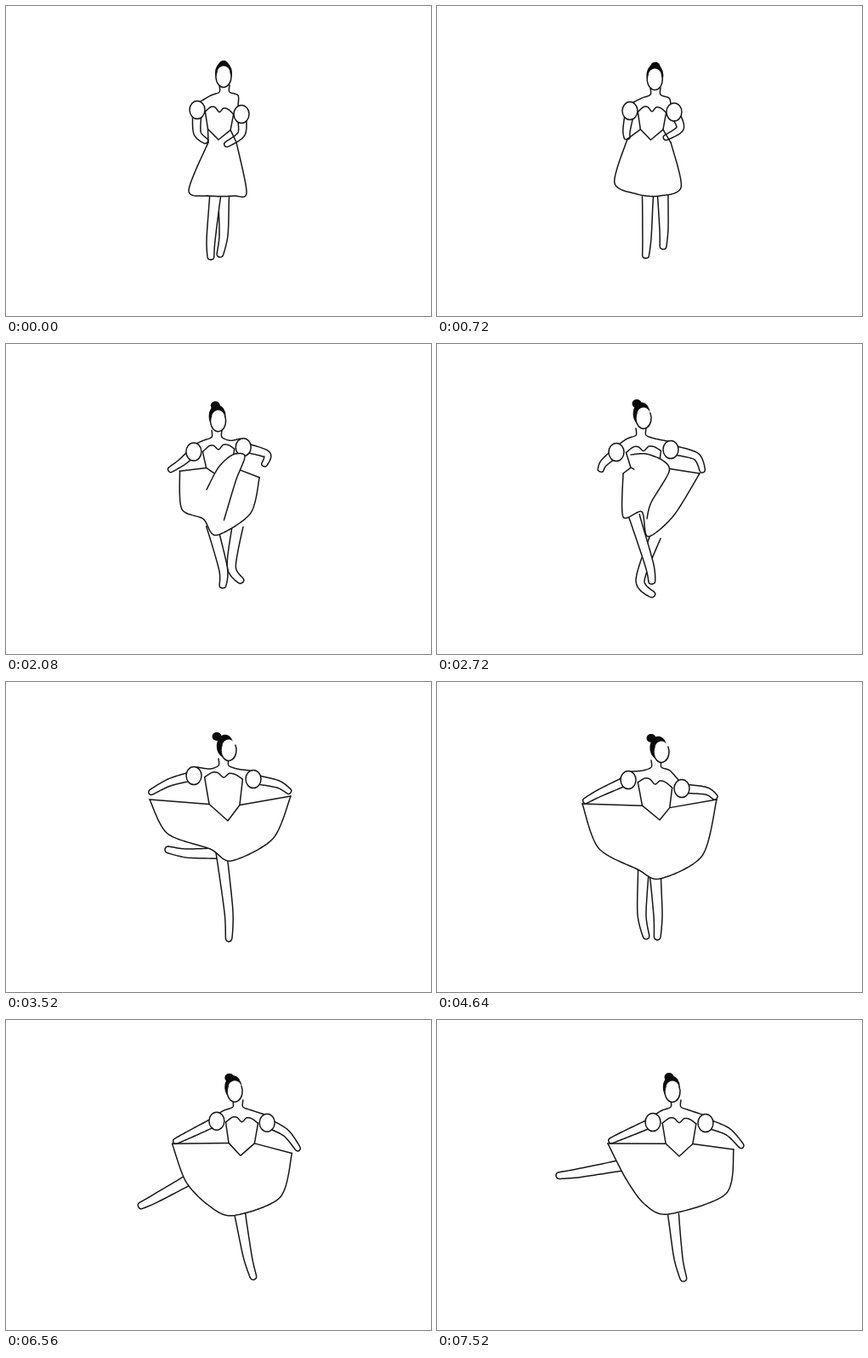
Animation of 500 by 364 pixels, one loop 7600 ms. Source, as an HTML page with a canvas:

```html
<!DOCTYPE html>
<html lang="en">
<head>
<meta charset="utf-8">
<title>Dancer</title>
<style>
html, body { margin: 0; width: 100%; height: 100%; overflow: hidden; background: #fff; }
canvas { display: block; }
</style>
</head>
<body>
<canvas id="stage" width="500" height="364"></canvas>
<script>
const ctx = document.getElementById('stage').getContext('2d');
const STEP = 80, LOOP = 7600, INK = '#161616';

// Joints of the dancer. Head: centre, bun, neck base. Arms: puff, elbow, hand.
// Legs: hip, ankle, toe. at = time in ms, ease = exponent of the move to the next pose.
const poses = [
  { at: 0, ease: 2, head: '256,83 256,69 257,101', waist: '250,157',
    armL: '225,122 225,149 237,160', armR: '277,127 277,150 257,164',
    legA: '246,224 241,275 241,298', legB: '256,224 256,269 251,295',
    hem: '238,160 215,217 240,223 268,223 283,219 271,160' },
  { at: 1360, ease: 1, head: '257,94 259,75 257,112', waist: '255,158',
    armL: '232,126 218,138 190,148', armR: '284,118 309,127 291,135',
    legA: '253,224 262,270 256,292', legB: '290,200 295,244 304,262',
    hem: '188,146 193,183 222,215 246,223 298,196 286,162',
    fold: '245,217 255,162 268,122 290,111 291,132 267,209' },
  { at: 2720, ease: .5, head: '243,87 235,70 240,107', waist: '250,156',
    armL: '211,127 196,140 192,150', armR: '275,124 305,132 313,151',
    legA: '232,202 250,260 253,282', legB: '257,226 239,278 256,296',
    hem: '219,152 219,203 241,197 248,226 278,202 309,152',
    fold: '228,130 246,129 266,137 273,150 252,186 247,205' },
  { at: 3520, ease: 1, head: '262,80 248,64 256,98', waist: '261,163',
    armL: '221,110 192,118 168,131', armR: '291,114 320,120 335,130',
    legA: '253,197 262,270 262,305', legB: '250,201 212,201 187,196',
    hem: '169,138 190,178 240,196 265,210 314,184 335,134' },
  { at: 4640, ease: 1, head: '264,82 252,66 258,100', waist: '262,162',
    armL: '225,115 192,130 172,141', armR: '288,125 317,128 329,137',
    legA: '257,229 260,275 259,303', legB: '243,220 241,273 247,302',
    hem: '171,143 190,195 236,220 262,231 312,204 329,138' },
  { at: 5600, ease: .6, head: '254,83 243,69 257,102', waist: '258,158',
    armL: '236,116 208,133 187,145', armR: '290,120 305,136 316,160',
    legA: '270,228 285,275 294,301', legB: '220,217 194,268 186,290',
    hem: '185,146 191,196 225,219 256,233 288,217 312,165' },
  { at: 7520, ease: 1, head: '277,84 273,67 281,102', waist: '285,160',
    armL: '254,120 222,134 202,143', armR: '316,121 342,131 360,150',
    legA: '278,228 284,280 291,307', legB: '215,171 165,180 140,183',
    hem: '201,145 222,186 244,216 272,228 340,204 349,152' }
];
const joints = ['head', 'waist', 'armL', 'armR', 'legA', 'legB', 'hem', 'fold'];

for (const pose of poses)
  for (const j of joints)
    pose[j] = pose[j] && pose[j].split(' ').map(p => p.split(',').map(Number));

const mix = (a, b, w) => a + (b - a) * w;
const between = (p, q, u, v = u) => [mix(p[0], q[0], u), mix(p[1], q[1], v)];
const shift = (p, x, y) => [p[0] + x, p[1] + y];

function poseAt(t) {
  let i = poses.length - 1;
  while (poses[i].at > t) i--;
  const a = poses[i], b = poses[i + 1] || a;
  const w = a === b ? 0 : ((t - a.at) / (b.at - a.at)) ** a.ease;
  const pose = {};
  for (const j of joints) {
    if (a[j] && b[j]) pose[j] = a[j].map((p, n) => between(p, b[j][n], w));
    else pose[j] = w < .5 ? a[j] : b[j];
  }
  return pose;
}

// Smooth curve through a few points
function curve(pts) {
  const out = [], last = pts.length - 1;
  for (let i = 0; i < last; i++) {
    const b = pts[i], c = pts[i + 1], a = pts[i - 1] || b, d = pts[i + 2] || c;
    for (let u = 0; u < 1; u += 1 / 16) {
      const v = 1 - u;
      out.push([0, 1].map(k =>
        v * v * v * b[k] + 3 * v * v * u * (b[k] + (c[k] - a[k]) / 7) +
        3 * v * u * u * (c[k] - (d[k] - b[k]) / 7) + u * u * u * c[k]));
    }
  }
  return [...out, pts[last]];
}

function trace(pts) {
  ctx.beginPath();
  pts.forEach(p => ctx.lineTo(...p));
}

function line(pts, filled) {
  trace(pts);
  if (filled) ctx.fill();
  ctx.stroke();
}

// Tapering outline around a curved limb, open at the top and rounded at the tip
function limb(pts, top, tip, filled) {
  const mid = curve(pts), n = mid.length - 1, left = [], right = [];
  mid.forEach((p, i) => {
    const a = mid[Math.max(0, i - 1)], b = mid[Math.min(n, i + 1)];
    const dx = b[0] - a[0], dy = b[1] - a[1], u = i / n;
    const cap = Math.sqrt(1 - Math.max(0, (u - .88) / .12) ** 2 || 0);
    const r = mix(top, tip, u) * cap / Math.hypot(dx, dy);
    left.push(shift(p, -dy * r, dx * r));
    right.unshift(shift(p, dy * r, -dx * r));
  });
  line([...left, ...right], filled);
}

function oval([x, y], rx, ry, from = 0, to = 2 * Math.PI) {
  ctx.beginPath();
  ctx.ellipse(x, y, rx, ry, 0, from, to);
}

function drawHead([head, bun, neck], puffs) {
  puffs.forEach((puff, i) => {
    const side = i ? 1 : -1;
    line(curve([shift(neck, side * 6, -8), shift(neck, side * 6, 0),
      shift(neck, side * 16, 4), shift(puff, -side * 4, -10)]));
  });
  ctx.fillStyle = '#0a0a0a';
  oval(between(head, bun, .3), 10, 13.5);
  ctx.fill();
  oval(bun, 5.5, 5);
  ctx.fill();
  ctx.fillStyle = '#fff';
  oval(head, 9, 12.5);
  ctx.fill();
  oval(head, 9, 12.5, -.5, Math.PI + .5);
  ctx.stroke();
}

function drawBodice(a, b, waist, cornerL, cornerR) {
  const edge = (u, rise) => shift(between(a, b, u), 0, -rise);
  line(curve([a, edge(.2, 6), edge(.35, 6), edge(.5, 1), edge(.65, 6), edge(.82, 5), b]));
  line([a, cornerL, waist, cornerR, b]);
}

function draw(t) {
  const { head, waist: [waist], armL, armR, legA, legB, hem, fold } = poseAt(t);
  const puffs = [armL[0], armR[0]];
  const [bustL, bustR] = [.18, .82].map(u => shift(between(...puffs, u), 0, 1));
  const [cornerL, cornerR] = [bustL, bustR].map(p => between(p, waist, .2, .62));
  ctx.fillStyle = '#fff';
  ctx.fillRect(0, 0, 500, 364);
  ctx.strokeStyle = INK;
  ctx.lineWidth = 1.5;
  ctx.lineCap = ctx.lineJoin = 'round';

  limb(legB, 6.5, 3.5, true);
  limb(legA, 6.5, 3.5, true);
  const edge = curve(hem);
  trace([...edge, waist]);
  ctx.fill();
  line(edge);
  line([hem[0], cornerL]);
  line([hem[hem.length - 1], cornerR]);
  drawBodice(bustL, bustR, waist, cornerL, cornerR);
  limb(armL, 5.5, 3);
  limb(armR, 5.5, 3);
  drawHead(head, puffs);
  ctx.fillStyle = '#fff';
  for (const puff of puffs) {
    oval(puff, 9, 10.5);
    ctx.fill();
    ctx.stroke();
  }
  if (fold) line(curve(fold), true);
}

function tick() {
  draw(Math.floor(performance.now() % LOOP / STEP) * STEP);
  requestAnimationFrame(tick);
}
tick();
</script>
</body>
</html>
```
